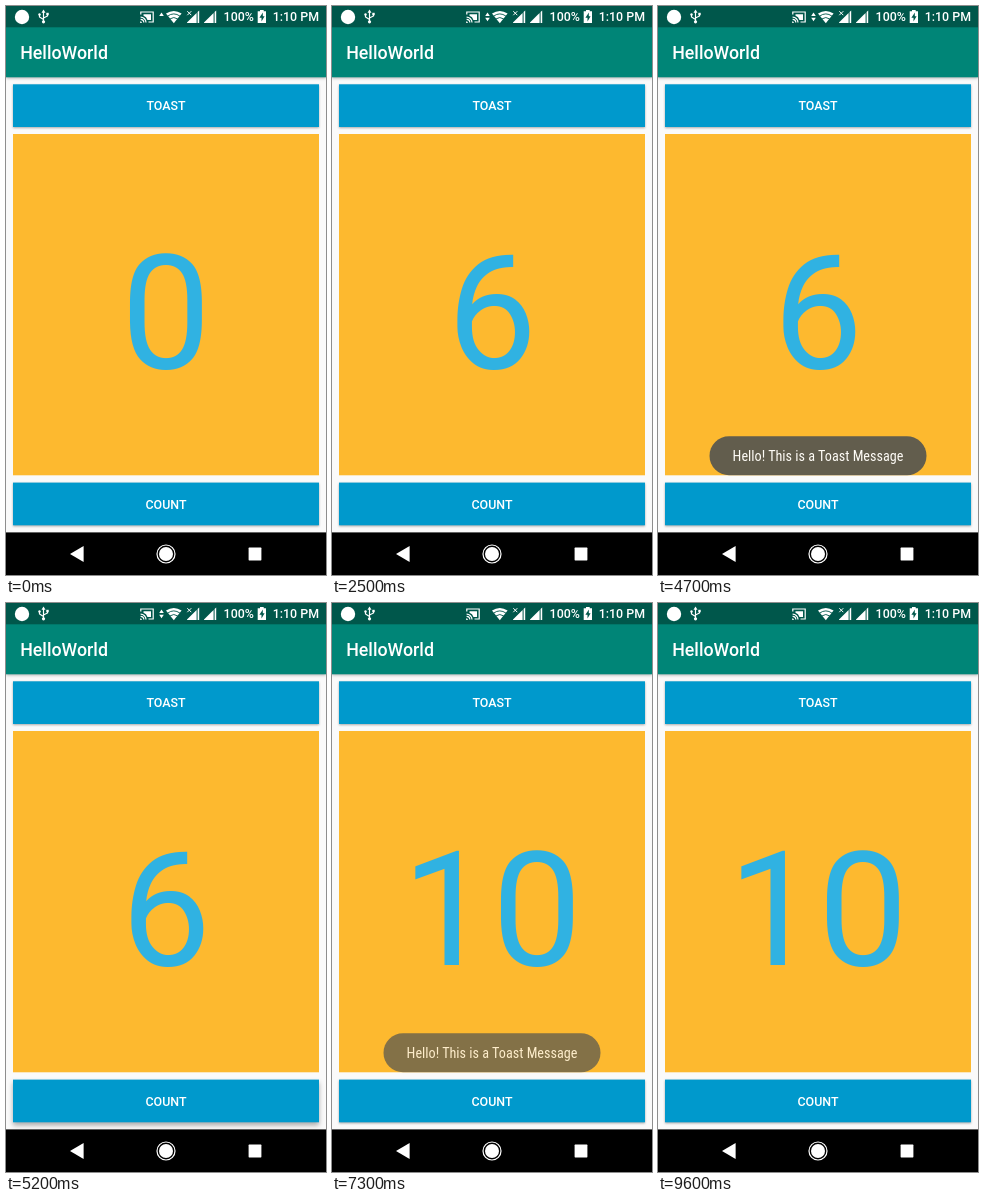
These frames come from a looping animation (320x569 px, 9.7 s). An HTML page:

```html
<!DOCTYPE html>
<html lang="en">
<head>
<meta charset="utf-8">
<title>HelloWorld</title>
<style>
  html, body { margin: 0; width: 100%; height: 100%; overflow: hidden; background: #000; }
  svg { display: block; width: 100%; height: 100%; font-family: Roboto, "Noto Sans", sans-serif; }
  .medium { font-weight: 500; }
  .mid { text-anchor: middle; }
  #message { font-family: "Roboto Condensed", Roboto, sans-serif; font-stretch: 75%; }
  #bar { filter: drop-shadow(0 1.5px 1.5px rgba(0, 0, 0, .28)); }
</style>
</head>
<body>
<svg viewBox="0 0 320 569" preserveAspectRatio="none">
  <rect width="320" height="569" fill="#fafafa"/>

  <rect id="bar" y="21" width="320" height="50.3" fill="#008577"/>
  <text class="medium" x="14.2" y="53.2" font-size="17.8" fill="#fff">HelloWorld</text>

  <rect width="320" height="21.3" fill="#00574b"/>
  <g fill="#fff">
    <circle cx="16" cy="11" r="7.2"/>
    <!-- USB -->
    <g stroke="#fff" stroke-width="1.2" fill="none">
      <path d="M37.5 6V15M37.5 13.5L33.5 11V8.5M37.5 12L41.5 10V7.5"/>
    </g>
    <path d="M37.5 3.5L39.5 6.7H35.5Z"/>
    <circle cx="37.5" cy="15.8" r="1.6"/>
    <circle cx="33.5" cy="8.5" r="1.2"/>
    <rect x="40.3" y="6.8" width="2.4" height="2.4"/>
    <!-- Cast -->
    <g stroke="#fff" stroke-width="1.2" fill="none">
      <path d="M134.8 8.5V6H147.2V16H142.5M134.6 11.2A5.4 5.4 0 0 1 140 16.6M134.6 13.4A3.2 3.2 0 0 1 137.8 16.6"/>
    </g>
    <path d="M134.2 15.2A1.7 1.7 0 0 1 135.9 16.9H134.2ZM137.5 8.2H145V14H141.5Q140.5 10.6 137.5 9.7Z"/>
    <!-- Data arrows -->
    <path id="up" d="M155.5 6.5L157.8 10H153.2Z"/>
    <path id="down" d="M155.5 15.3L157.8 11.8H153.2Z"/>
    <!-- Wi-Fi -->
    <path d="M167.8 17.2L160 7.6Q167.8 2.2 175.6 7.6Z"/>
    <g stroke="#00574b" stroke-width=".9" fill="none">
      <path d="M161.5 10.2Q167.8 5.6 174.1 10.2M163.8 13Q167.8 10 171.8 13"/>
    </g>
    <!-- Signal -->
    <g id="signal">
      <path d="M181 17V16.6L190.6 7V17ZM191.6 6L193.2 4.6V17H191.6Z"/>
    </g>
    <use href="#signal" x="17"/>
    <path d="M181.3 5.2L185.3 9.2M185.3 5.2L181.3 9.2" stroke="#fff" stroke-width="1"/>
    <!-- Battery -->
    <path d="M254 4H257.7V5.3H260V17H251.7V5.3H254Z"/>
    <path d="M256.8 6.6L253.4 11.8H255.5V15.6L258.6 10.3H256.8Z" fill="#00574b"/>
    <g class="medium" font-size="12.4">
      <text x="217.6" y="15.4">100%</text>
      <text x="313" y="15.4" text-anchor="end">1:10 PM</text>
    </g>
  </g>

  <rect x="7" y="128" width="306" height="341.3" fill="#fdb92f"/>
  <text id="count" class="mid" x="160" y="362" font-size="160" fill="#30b2e2">0</text>

  <g class="medium mid" font-size="12.44" fill="#fff">
    <rect id="toastBtn" x="7" y="78.3" width="306" height="42.7" fill="#0099cc"/>
    <text x="160" y="104.4">TOAST</text>
    <rect id="countBtn" x="7" y="476.6" width="306" height="42.7" fill="#0099cc"/>
    <text x="160" y="502.6">COUNT</text>
  </g>

  <g id="toast">
    <rect x="51.5" y="430.2" width="217" height="39" rx="19.5" fill="#5c5a4f"/>
    <text id="message" class="mid" x="160" y="455" font-size="14.2" fill="#fff">Hello! This is a Toast Message</text>
  </g>

  <rect y="526.4" width="320" height="42.6" fill="#000"/>
  <g fill="#fff">
    <path d="M64 548L77.6 540V556Z"/>
    <circle cx="160" cy="548" r="7"/>
    <circle cx="160" cy="548" r="9" fill="none" stroke="#fff" stroke-width="1.2"/>
    <rect x="242.6" y="541.6" width="12.8" height="12.8" rx=".6"/>
  </g>
</svg>
<script>
const LOOP = 9700;
const countTaps = [220, 800, 1120, 1500, 1850, 2200, 5250, 5750, 6150, 6600];
const toastTaps = [2850, 7050];
const toasts = [{ show: 2800, hide: 4600 }, { show: 7050, hide: 9080 }];
const FADE = 500;
const arrows = [[0, 1, 0], [700, 1, 1], [5700, 0, 1], [6700, 0, 0]];

const el = id => document.getElementById(id);
const clamp = v => Math.min(1, Math.max(0, v));

// Without a condensed face, use the regular one at a size that fits the pill.
const message = el('message');
if (message.getComputedTextLength() > 185) message.setAttribute('font-size', 12.6);

// 0 at rest, 1 while a finger holds the button
const lift = (taps, t) => Math.max(...taps.map(at => clamp(1 - (Math.abs(t - at + 40) - 30) / 100)));

function shade(id, k) {
  el(id).style.filter = `drop-shadow(0 ${1.3 + 1.7 * k}px ${1.3 + 1.5 * k}px rgba(0,0,0,.32))`;
}

function toastAlpha(t) {
  return Math.max(...toasts.map(({ show, hide }) => {
    const enter = 1 - (1 - clamp((t - show) / FADE)) ** 2;
    const leave = clamp((t - hide) / FADE) ** 2;
    return enter * (1 - leave);
  }));
}

function draw(t) {
  el('count').textContent = countTaps.filter(at => at <= t).length;
  shade('countBtn', lift(countTaps, t));
  shade('toastBtn', lift(toastTaps, t));
  el('toast').setAttribute('opacity', toastAlpha(t));
  const [, up, down] = arrows.filter(a => a[0] <= t).pop();
  el('up').setAttribute('opacity', up);
  el('down').setAttribute('opacity', down);
}

const start = performance.now();
function tick() {
  draw((performance.now() - start) % LOOP);
  requestAnimationFrame(tick);
}
tick();
</script>
</body>
</html>
```
